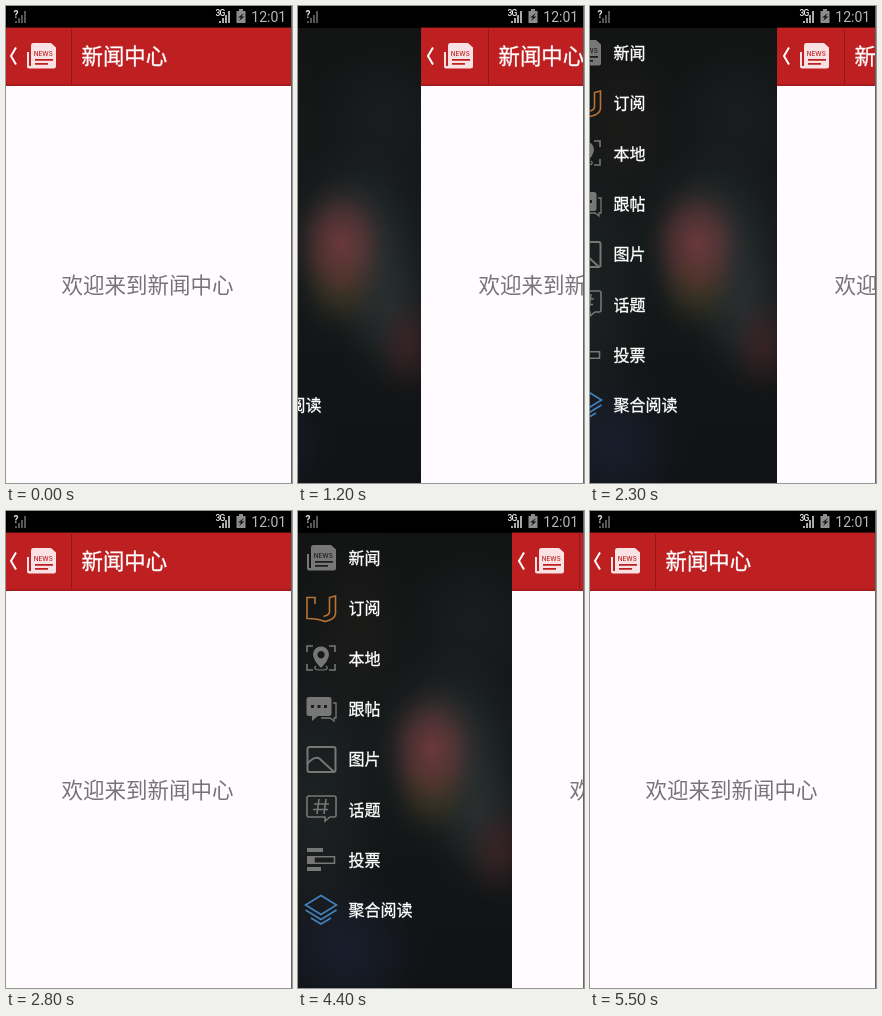
An HTML page that plays this animation: 286x477 px, repeating every 5.9 s.

```html
<!DOCTYPE html>
<html lang="zh-CN">
<head>
<meta charset="utf-8">
<title>新闻中心</title>
<style>
html, body { margin: 0; width: 100%; height: 100%; overflow: hidden; background: #000; }
svg { display: block; width: 286px; height: 477px; }
text { font-family: "Noto Sans CJK SC", "Noto Sans CJK", "Noto Sans", sans-serif; }
.line { fill: none; stroke: #777; stroke-width: 1.6; }
.solid { fill: #777; }
.bright { fill: #fff; stroke: #fff; stroke-width: .3; }
.latin { font-family: Roboto, Arial, sans-serif; }
.wide { font-family: Inter, sans-serif; }
</style>
</head>
<body>
<svg viewBox="0 0 286 477">
  <defs>
    <linearGradient id="base" x2="0" y2="1">
      <stop offset="0" stop-color="#121414"/>
      <stop offset=".45" stop-color="#15191a"/>
      <stop offset="1" stop-color="#101213"/>
    </linearGradient>
    <g id="paper">
      <path d="M21 46h2v14h3v2.500h-3q-2 0-2-2z"/>
      <path d="M27 37h18l5 4.500v18.500q0 2.500-2.500 2.500h-21q-1.500 0-1.500-2v-21q0-2.500 2-2.500z"/>
    </g>
    <g id="print">
      <text class="wide" x="27.800" y="50.300" font-size="6.300" font-weight="500">NEWS</text>
      <path d="M29 53h18v1.800h-18zM29 57h13v1.800h-13z"/>
    </g>
    <path id="signal" d="M0 12v-2h2v2zM3 12v-5h2v5zM6 12v-8h2v8zM9 12v-12h2v12z"/>
  </defs>

  <g id="track">
    <g id="menu">
      <rect y="22" width="215" height="455" fill="url(#base)"/>
      <g id="glow"></g>

      <g transform="translate(-12 -3)">
        <use href="#paper" fill="#777"/>
        <use href="#print" fill="#1b1d1e"/>
      </g>
      <path class="line" style="stroke:#b87436" d="M17 93v-6.500h-8v21q11 0 18 3q10-2 10.500-8v-17.500l-6 1.500v14.500q0 3-6 4.500"/>
      <path class="line" d="M9 141v-6h6M31 135h6v6M37 153v6h-6M15 159h-6v-6"/>
      <path class="solid" fill-rule="evenodd" d="M23 157q-8-8-8-13.500a8 8 0 0 1 16 0q0 5.500-8 13.500zM23 140a3.700 3.700 0 1 0 .1 0z"/>
      <path class="line" style="stroke-width:1.200" d="M18 155q-4 4 5 4q9 0 5-4"/>
      <path class="line" style="stroke-width:1.300" d="M35 192h3v15h-2v3l-4-3h-9"/>
      <path class="solid" d="M11 186h20q2.500 0 2.500 2.500v14q0 2.500-2.500 2.500h-11l-6 5v-5h-3q-2.500 0-2.500-2.500v-14q0-2.500 2.500-2.500z"/>
      <path fill="#1b1d1e" d="M13 194h3v3h-3zM19.500 194h3v3h-3zM26 194h3v3h-3z"/>
      <rect class="line" style="stroke-width:2" x="9.500" y="236" width="28" height="25" rx="2"/>
      <path class="line" style="stroke-width:2" d="M9 253q8-9 13-5l14 13"/>
      <path class="line" d="M11 285h25q2 0 2 2v17q0 2-2 2h-4l-5 4v-4h-16q-2 0-2-2v-17q0-2 2-2z"/>
      <path class="line" d="M21 288l-2 15M28 288l-2 15M16 293h15M15 298.500h15"/>
      <path class="solid" d="M9 337h16v4h-16zM9 345h7v8h-7zM9 356h14v4h-14z"/>
      <path class="line" d="M16 345.700h20.500v6.600h-20.500z"/>
      <path class="line" style="stroke:#4283bd" d="M23 384.500l15.500 9.500-15.500 9.500-15.500-9.500zM7.500 399l15.500 9.500 15.500-9.500M13 407l10 6 10-6"/>
    </g>

    <g transform="translate(216 0)">
      <rect x="-2" y="22" width="290" height="455" fill="#fffbff"/>
      <rect x="-2" y="22" width="290" height="57" fill="#be2021"/>
      <rect x="-2" y="21" width="290" height="1" fill="#4a0d0e"/>
      <rect x="-2" y="78" width="290" height="2" fill="#a81c1d"/>
      <rect x="65" y="23" width="1" height="55" fill="#8f1717"/>
      <path d="M10 41.500l-5 8.500 5 8.500" fill="none" stroke="#fff" stroke-width="2"/>
      <use href="#paper" fill="#fae2e4"/>
      <use href="#print" fill="#be2021"/>
      <text class="bright" x="75.500" y="58.300" font-size="21.400">新闻中心</text>
      <text x="55.500" y="287" font-size="21.500" fill="#777477">欢迎来到新闻中心</text>
    </g>
  </g>

  <rect width="286" height="21"/>
  <rect x="285" width="1" height="477" fill="#666"/>
  <use href="#signal" x="9" y="5" fill="#555"/>
  <text class="latin" x="7.500" y="12" font-size="10" font-weight="700" fill="#ddd">?</text>
  <use href="#signal" x="213" y="5" fill="#aaa"/>
  <text class="latin" x="209.500" y="10" font-size="8.500" font-weight="500" letter-spacing="-.9" fill="#eee" stroke="#000" stroke-width="1.200" paint-order="stroke">3G</text>
  <path d="M233 3h4v2h2.500v12h-9v-12h2.500z" fill="#8d8d8d"/>
  <path d="M238 7l-6 4.500h3l-2 3.500 5.500-4.500h-3z" fill="#111"/>
  <text class="latin" x="245.300" y="16" font-size="14" fill="#b8b8b8">12:01</text>
</svg>
<script>
const SVG = 'http://www.w3.org/2000/svg';
const LOOP = 5900, OPEN = 216;

function add(parent, tag, attrs, text = '') {
  const el = document.createElementNS(SVG, tag);
  for (const key in attrs) el.setAttribute(key, attrs[key]);
  el.textContent = text;
  return parent.appendChild(el);
}

const menu = document.getElementById('menu');
['新闻', '订阅', '本地', '跟帖', '图片', '话题', '投票', '聚合阅读'].forEach((label, i) =>
  add(menu, 'text', { class: 'bright', x: 50.5, y: 53 + i * 50.3, 'font-size': 16 }, label));

// Blurred lights behind the menu: cx, cy, rx, ry, colour, opacity
const glow = document.getElementById('glow');
const defs = document.querySelector('defs');
[
  [175, 110, 75, 85, '#202727', 0.4],
  [15, 300, 80, 190, '#262c2c', 0.5],
  [60, 120, 60, 110, '#221e1b', 0.5],
  [50, 440, 85, 85, '#1c2236', 0.7],
  [150, 240, 80, 110, '#384142', 0.6],
  [182, 305, 55, 85, '#353b3c', 0.55],
  [202, 340, 40, 55, '#4c262a', 0.55],
  [134, 280, 46, 50, '#453a1e', 0.6],
  [134, 238, 52, 66, '#783a3c', 0.85]
].forEach(([cx, cy, rx, ry, color, opacity], i) => {
  const grad = add(defs, 'radialGradient', { id: 'light' + i });
  [[0, 1], [0.45, 0.55], [0.75, 0.15], [1, 0]].forEach(([offset, k]) =>
    add(grad, 'stop', { offset, 'stop-color': color, 'stop-opacity': opacity * k }));
  add(glow, 'ellipse', { cx, cy, rx, ry, fill: `url(#light${i})` });
});

// Time in ms, page shift in px; each position holds until the next
const steps = [
  [0, 0], [900, 30], [1000, 62], [1100, 94], [1200, 125], [1300, 156], [1400, 187], [1500, OPEN],
  [2300, 189], [2400, 146], [2600, 84], [2700, 27], [2800, 0],
  [3800, 22], [3900, 54], [4000, 87], [4100, 119], [4200, 151], [4300, 184], [4400, OPEN],
  [4900, 190], [5000, 153], [5100, 115], [5200, 76], [5300, 38], [5400, 1], [5500, 0], [LOOP, 0]
];
document.getElementById('track').animate(
  steps.map(([time, shift]) => ({
    offset: time / LOOP,
    transform: `translateX(${shift - OPEN}px)`,
    easing: 'step-end'
  })),
  { duration: LOOP, iterations: Infinity }
);
</script>
</body>
</html>
```
